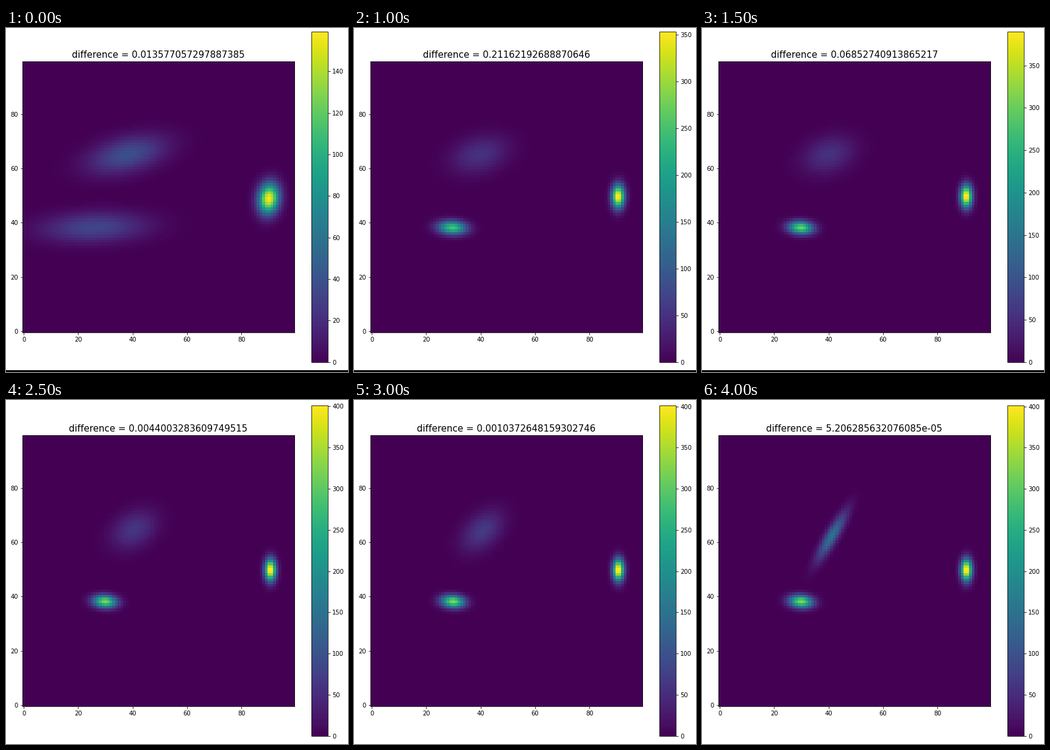
These frames come from a looping animation (561x566 px, 4.5 s). A matplotlib script:

```python
import numpy as np
import matplotlib.pyplot as plt
from matplotlib.animation import FuncAnimation
from matplotlib.patches import Rectangle

W, H, DPI = 561, 566, 72
STEPS = 9
N = 100          # histogram cells per side
MASS = 10000     # samples per cluster

# Title text of each step
DIFFS = """
0.013577057297887385 0.08463915270418326 0.21162192688870646
0.06852740913865217 0.017035010063335344 0.0044003283609749515
0.0010372648159302746 0.00022339079758603998 5.206285632076085e-05
""".split()

X, Y = np.meshgrid(np.arange(N), np.arange(N))


def settle(start, end, rate, i):
    """Move from start towards end, keeping a fixed share of the gap per step."""
    start, end = np.array(start), np.array(end)
    return end + (start - end) * rate ** i


# Cluster states: mean x, mean y, sigma x, sigma y, correlation
def upper(i):
    state = settle((38, 65, 9.5, 4.75, 0.4), (40.5, 65, 5.6, 4.6, 0.2), 0.6, i)
    final = np.array((41.1, 62.2, 3.7, 6.0, 0.88))
    late = (i / (STEPS - 1)) ** 4
    return state + (final - state) * late


def lower(i):
    return settle((25.8, 38.2, 12.8, 3.75, 0.12),
                  (29.8, 38.1, 3.0, 1.61, -0.1), 0.25, i)


def right(i):
    return settle((89.9, 48.8, 2.6, 3.85, 0.1),
                  (90.5, 49.7, 1.41, 2.81, 0), 0.4, i)


def top(i):
    """Highest cell count, which also tops the colour scale."""
    return 401 - 242 * np.exp(-0.546 * i ** 1.57)


def cluster(mx, my, sx, sy, rho):
    u, v = (X - mx) / sx, (Y - my) / sy
    q = 1 - rho ** 2
    peak = MASS / (2 * np.pi * sx * sy * np.sqrt(q))
    return peak * np.exp(-(u * u - 2 * rho * u * v + v * v) / (2 * q))


def density(i):
    bright = cluster(*right(i))
    bright *= top(i) / bright.max()
    return cluster(*upper(i)) + cluster(*lower(i)) + bright


def box(x, y, width, height):
    return [x / W, 1 - (y + height) / H, width / W, height / H]


def place(lift):
    ax.set_position(box(26.8, 57.8 - lift, 446.4, 446.4))
    cax.set_position(box(501.1, 9.2 - lift, 27.18, 543.6))


fig = plt.figure(figsize=(W / DPI, H / DPI), dpi=DPI, facecolor="white")
ax, cax = fig.add_axes([0, 0, 1, 1]), fig.add_axes([0, 0, 0.5, 1])
place(0)
image = ax.imshow(density(0), origin="lower", cmap="viridis",
                  interpolation="nearest", aspect="auto", vmin=0, vmax=top(0))
fig.colorbar(image, cax=cax)
title = ax.set_title("", fontsize=15)
strip = fig.add_artist(Rectangle((0, 0), 1, 3 / H, transform=fig.transFigure,
                                 color="black", linewidth=0))


def draw(i):
    # The layout drops by 3 px once the 400 label overhangs the bar.
    early = top(i) < 400
    place(3 if early else 0)
    strip.set_visible(early)
    image.set_data(density(i))
    image.set_clim(0, top(i))
    title.set_text("difference = " + DIFFS[i])
    return image, title, strip


anim = FuncAnimation(fig, draw, frames=STEPS, interval=500, repeat=True,
                     repeat_delay=0, blit=False)
plt.show()
```
